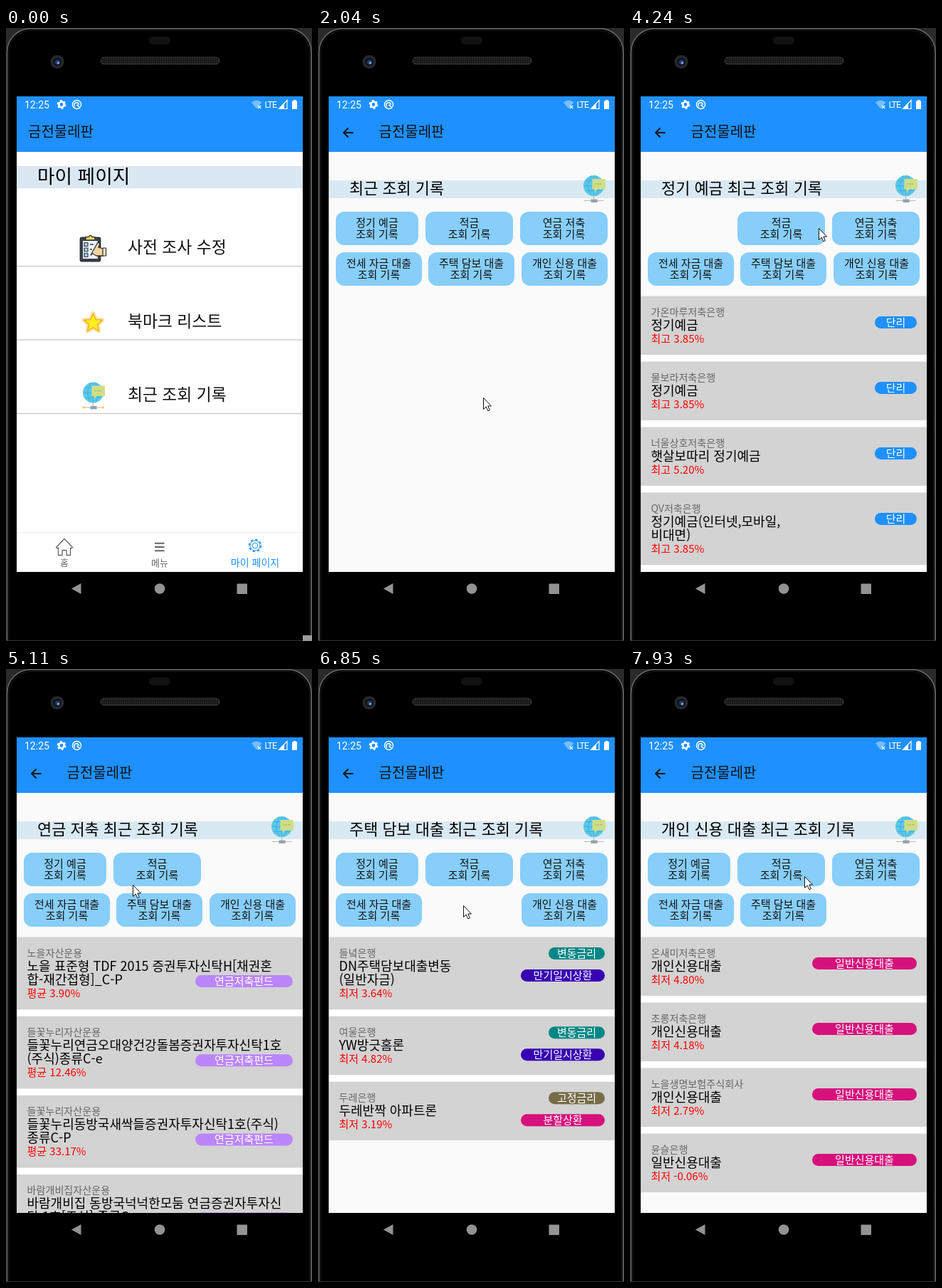
An HTML page that plays this animation: 430x861 px, repeating every 7990 ms.

```html
<!DOCTYPE html>
<html lang="ko">
<head>
<meta charset="utf-8">
<style>
html, body { margin: 0; width: 100%; height: 100%; overflow: hidden; background: #000; }
svg { display: block; width: 430px; height: 861px; }
text { font-family: "Noto Sans CJK KR", "Noto Sans CJK", "Noto Sans", sans-serif; }
.ui { font-family: Roboto, sans-serif; }
</style>
</head>
<body>
<svg id="stage" viewBox="0 0 430 861" xmlns="http://www.w3.org/2000/svg">
  <defs>
    <clipPath id="screenClip"><rect x="15" y="96" width="402" height="668"/></clipPath>
    <pattern id="mesh" width="3" height="3" patternUnits="userSpaceOnUse">
      <rect width="3" height="3" fill="#161616"/><circle cx="1.5" cy="1.5" r=".8" fill="#3c3c3c"/>
    </pattern>
    <g id="globe">
      <circle r="14.5" fill="#5bc8ea"/>
      <path d="M-14 0H14M-12-7H12M-12 7H12M0-14V14M-3-14Q-13 0-3 14M3-14Q13 0 3 14" fill="none" stroke="#3fa9d6" stroke-width=".8"/>
      <path d="M-2-9.500H16.500V5H5L1 9.500V5H-2Z" fill="#d0de88"/>
      <path d="M2-2.500H12" stroke="#aab866" stroke-width="1.500" stroke-dasharray="2 1.200"/>
      <path d="M0 14V19M-14 21H14" stroke="#b9bdb0" stroke-width="1.200"/>
      <rect x="-4" y="19" width="9" height="4.500" fill="#93a3ad"/>
    </g>
  </defs>

  <rect width="430" height="861" fill="#2a2a2b"/>
  <rect x="1.500" y=".8" width="427.500" height="900" rx="33" fill="#000" stroke="#5e6161" stroke-width="1.800"/>
  <rect x="4" y="3.500" width="422.500" height="900" rx="31" fill="#000" stroke="#1c1c1d"/>
  <path d="M0 860.500H430" stroke="#333"/>
  <rect x="201" y="12" width="30" height="11" rx="5.500" fill="#111"/>
  <rect x="133" y="41" width="167" height="10" rx="5" fill="url(#mesh)" stroke="#3a3a3a"/>
  <circle cx="72" cy="47.500" r="9.500" fill="#26282b"/>
  <circle cx="72" cy="47.500" r="6" fill="#101420"/>
  <circle cx="72.500" cy="48" r="3.300" fill="#27406b"/>
  <circle cx="73.500" cy="49" r="1.500" fill="#86b2ef"/>
  <g fill="#939393">
    <path d="M92 787.500L105.500 780V795Z"/><circle cx="216" cy="787.500" r="7.300"/>
    <rect x="324.500" y="780.500" width="14.500" height="14.500" rx="1"/>
  </g>
  <rect id="corner" x="417" y="853" width="13" height="8" fill="#9b9b9b"/>

  <g clip-path="url(#screenClip)">
    <rect id="paper" x="15" y="96" width="402" height="668"/>
    <g id="home">
      <rect x="15" y="194" width="402" height="31" fill="#d9e8f2"/>
      <path d="M15 334.500H417M15 438H417M15 541.500H417" stroke="#cfcfcf" stroke-width="1.400"/>
      <path d="M15 708.500H417" stroke="#ececec"/>
      <!-- clipboard -->
      <g stroke="#30343b" stroke-width="1.800" stroke-linejoin="round">
        <rect x="104.500" y="294.500" width="28" height="33" rx="2" fill="#3c434d"/>
        <rect x="107.500" y="298.500" width="22" height="26" fill="#eef6fb" stroke-width="1"/>
        <path d="M112 298V293.500H116Q118.500 289 121 293.500H125V298Z" fill="#f1d65c" stroke-width="1.300"/>
        <g fill="#9fd5ef" stroke-width="1.200">
          <rect x="110" y="301.500" width="5" height="5"/><rect x="110" y="309" width="5" height="5"/><rect x="110" y="316.500" width="5" height="5"/>
        </g>
        <path d="M118 304H123M118 311H121" stroke-width="1.400"/>
        <path d="M119 319L129 301L132 303L130 308L137 310V320H127L122 317Z" fill="#f4d3a0" stroke-width="1.300"/>
        <rect x="136" y="309" width="4.500" height="11" fill="#f6e7b9" stroke-width="1.200"/>
      </g>
      <path id="halo" fill="#fbe3a0" stroke="#fbe3a0" stroke-width="6" stroke-linejoin="round"/>
      <path id="star" fill="#ffee22" stroke="#f0b429" stroke-width="1.600" stroke-linejoin="round"/>
      <use href="#globe" x="122.500" y="512"/>
      <circle cx="109" cy="533" r="1.800" fill="#f2d24f"/><circle cx="136" cy="533" r="1.800" fill="#f2d24f"/>
      <g fill="none" stroke="#666" stroke-width="1.300" stroke-linejoin="round">
        <path d="M70.500 729.500L82 717.500L93.500 729.500L91.500 731L90.500 730V740.500H85V733.500H79V740.500H73.500V730L72.500 731Z"/>
        <path d="M209 723.700H222.500M209 729H222.500M209 734.300H222.500" stroke-width="1.900"/>
      </g>
      <g fill="none" stroke="#1e90ff">
        <circle cx="350" cy="727" r="7"/><circle cx="350" cy="727" r="3.800"/>
        <circle cx="350" cy="727" r="8.300" stroke-width="1.800" stroke-dasharray="3.260"/>
      </g>
    </g>
    <g id="history">
      <rect x="15" y="214" width="402" height="25" fill="#d9e9f3"/>
      <use href="#globe" x="387.500" y="221.500"/>
    </g>
    <rect x="15" y="96" width="402" height="78" fill="#1e90ff"/>
    <g id="bar">
      <path id="back" d="M49.500 147H36.500M42.500 140.500L36 147L42.500 153.500" fill="none" stroke="#111" stroke-width="1.800"/>
      <g fill="none" stroke="#fff">
        <circle cx="78" cy="107.500" r="3.700" stroke-width="2.600"/>
        <circle cx="78" cy="107.500" r="5.500" stroke-width="1.800" stroke-dasharray="2.880"/>
        <circle cx="99.500" cy="107.500" r="6" stroke-width="1.400"/>
        <path d="M97 110.500A3.300 3.300 0 1 1 102.500 108M99.500 107.500L103 111" stroke-width="1.500"/>
      </g>
      <path d="M345 104.500Q352 98.500 359.500 104.500L352 113.500Z" fill="#fff" opacity=".4"/>
      <path d="M354 109L358 113M358 109L354 113" stroke="#fff" stroke-width="1.300"/>
      <path d="M383.500 113.500H395V101.500Z" fill="none" stroke="#fff" stroke-width="1.200"/>
      <path d="M383.500 113.500H391V105.500Z" fill="#fff"/>
      <path d="M402 102.500H404V101H407.500V102.500H409V114H402Z" fill="#fff"/>
      <text class="ui" x="26" y="112.800" font-size="14" fill="#fff">12:25</text>
      <text class="ui" x="363.500" y="112.200" font-size="12.500" fill="#fff" letter-spacing="-1">LTE</text>
    </g>
    <rect id="scroll" x="413" y="376" width="4" height="103" fill="#000" opacity=".3"/>
  </g>
  <path id="cursor" d="M.5.5V16.500L4.200 13L6.800 18.800L9.300 17.700L6.800 12H11.500Z" fill="#fff" stroke="#111" stroke-width="1"/>
</svg>
<script>
const NS = 'http://www.w3.org/2000/svg';
const $ = id => document.getElementById(id);
const LOOP = 7990;

function add(parent, tag, attrs) {
  const el = document.createElementNS(NS, tag);
  for (const k in attrs) el.setAttribute(k, attrs[k]);
  parent.appendChild(el);
  return el;
}

// text placed by its vertical middle
function label(parent, x, mid, size, str, fill = '#111', anchor = 'start', weight = 500) {
  const el = add(parent, 'text', {
    x, y: mid + size * 0.37, 'font-size': size, fill, 'text-anchor': anchor, 'font-weight': weight
  });
  el.textContent = str;
  return el;
}

const show = (el, on) => el.setAttribute('visibility', on ? 'inherit' : 'hidden');

// home page
const home = $('home');
label(home, 44, 208.5, 26.7, '마이 페이지', '#000');
['사전 조사 수정', '북마크 리스트', '최근 조회 기록'].forEach((s, i) =>
  label(home, 171, 307.5 + i * 103.7, 22.8, s));
label(home, 82, 751, 12.5, '홈', '#666', 'middle', 400);
label(home, 216, 751, 13, '메뉴', '#666', 'middle', 400);
label(home, 350, 750.5, 14, '마이 페이지', '#1e90ff', 'middle');

let star = '';
for (let i = 0; i < 10; i++) {
  const a = -Math.PI / 2 + i * Math.PI / 5, r = i % 2 ? 6.2 : 13.5;
  star += (i ? 'L' : 'M') + (122.5 + r * Math.cos(a)).toFixed(1) + ' ' + (414.5 + r * Math.sin(a)).toFixed(1);
}
for (const id of ['halo', 'star']) $(id).setAttribute('d', star + 'Z');

// history page
const TEAL = '#008080', BLUE = '#1e90ff', PINK = '#d6117b', VIOLET = '#3700b3';
// mid: distance from the card's top to the middle of a lone tag
const tag = (text, w, fill, mid = 37) => ({ text, w, fill, mid });
const simple = tag('단리', 59, BLUE);
const free = tag('자유적립식', 98, '#0000cd');
const fixed = tag('정액적립식', 98, TEAL);
const fund = tag('연금저축펀드', 137, '#bb86fc', 62);
const floating = tag('변동금리', 79, '#018786');
const steady = tag('고정금리', 79, '#776c49');
const bullet = tag('만기일시상환', 118, VIOLET);
const split = tag('분할상환', 118, PINK);
const credit = tag('일반신용대출', 147, PINK);

// card: bank, product lines joined by "|", rate, tags
const tabs = [
  { name: '정기 예금', x: 25, w: 116, row: 0, cards: [
    ['가온마루저축은행', '정기예금', '최고 3.85%', simple],
    ['물보라저축은행', '정기예금', '최고 3.85%', simple],
    ['너울상호저축은행', '햇살보따리 정기예금', '최고 5.20%', simple],
    ['QV저축은행', '정기예금(인터넷,모바일,|비대면)', '최고 3.85%', simple]] },
  { name: '적금', x: 151, w: 123, row: 0, cards: [
    ['도담은행', '콩알가득적금', '최고 5.20%', simple, free],
    ['해담저축은행', '해담 걸음 적금', '최고 10.00%', simple, fixed],
    ['다온누리저축은행', '달마다모음적금', '최고 4.30%', simple, fixed],
    ['보늬저축은행', '보늬네 냥적금 with 몽냥', '최고 5.00%', simple, fixed],
    ['도담은행', '콩알가득적금', '최고 5.20%', simple, free]] },
  { name: '연금 저축', x: 284, w: 123, row: 0, cards: [
    ['노을자산운용', '노을 표준형 TDF 2015 증권투자신탁H[채권혼|합-재간접형]_C-P', '평균 3.90%', fund],
    ['들꽃누리자산운용', '들꽃누리연금오대양건강돌봄증권자투자신탁1호|(주식)종류C-e', '평균 12.46%', fund],
    ['들꽃누리자산운용', '들꽃누리동방국새싹들증권자투자신탁1호(주식)|종류C-P', '평균 33.17%', fund],
    ['바람개비집자산운용', '바람개비집 동방국넉넉한모둠 연금증권자투자신|탁 1호[주식] 종류C', '평균 8.20%', fund]] },
  { name: '전세 자금 대출', x: 25, w: 121, row: 1, cards: [
    ['들녘은행', '전세자금대출', '최저 3.42%', floating, bullet],
    ['여울은행', '전세자금대출', '최저 3.75%', floating, bullet],
    ['두레은행', '전월세보증금대출', '최저 3.58%', steady, bullet],
    ['윤슬은행', '전세자금대출', '최저 4.05%', floating, bullet],
    ['도담은행', '전세자금대출', '최저 4.11%', floating, bullet]] },
  { name: '주택 담보 대출', x: 155, w: 121, row: 1, cards: [
    ['들녘은행', 'DN주택담보대출변동|(일반자금)', '최저 3.64%', floating, bullet],
    ['여울은행', 'YW방긋홈론', '최저 4.82%', floating, bullet],
    ['두레은행', '두레반짝 아파트론', '최저 3.19%', steady, split]] },
  { name: '개인 신용 대출', x: 286, w: 121, row: 1, cards: [
    ['온새미저축은행', '개인신용대출', '최저 4.80%', credit],
    ['초롱저축은행', '개인신용대출', '최저 4.18%', credit],
    ['노을생명보험주식회사', '개인신용대출', '최저 2.79%', credit],
    ['윤슬은행', '일반신용대출', '최저 -0.06%', credit]] }
];

function drawTag(g, t, mid) {
  add(g, 'rect', { x: 403 - t.w, y: mid - 8.5, width: t.w, height: 17, rx: 8.5, fill: t.fill });
  label(g, 403 - t.w / 2, mid, 15, t.text, '#fff', 'middle');
}

function drawCards(g, cards) {
  let y = 376.5;
  for (const [bank, product, rate, ...tags] of cards) {
    const lines = product.split('|'), extra = (lines.length - 1) * 19.2;
    add(g, 'rect', { x: 15, y, width: 402, height: 92 + extra, fill: '#fff' });
    add(g, 'rect', { x: 15, y, width: 402, height: 82.5 + extra, fill: '#d3d3d3' });
    label(g, 29.5, y + 22, 14.1, bank, '#666', 'start', 400);
    lines.forEach((s, i) => label(g, 29.5, y + 40.5 + i * 19.2, 18, s, '#000'));
    label(g, 29.5, y + 59.5 + extra, 15, rate, '#f00');
    if (tags.length > 1) tags.forEach((t, i) => drawTag(g, t, y + 23 + i * 31));
    else drawTag(g, tags[0], y + tags[0].mid);
    y += 92 + extra;
  }
  // no gap strip below the last card when the list ends on screen
  if (y < 760) add(g, 'rect', { x: 15, y: y - 9.5, width: 402, height: 10, fill: '#fafafa' });
}

const history = $('history');
const heading = label(history, 44, 225, 21.9, '', '#000');
for (const tab of tabs) {
  const y = 258 + tab.row * 57, cx = tab.x + tab.w / 2;
  tab.button = add(history, 'g', {});
  add(tab.button, 'rect', { x: tab.x, y, width: tab.w, height: 47, rx: 12, fill: '#87cefa' });
  label(tab.button, cx, y + 15.3, 15, tab.name, '#111', 'middle');
  label(tab.button, cx, y + 31.3, 15, '조회 기록', '#111', 'middle');
  tab.list = add(history, 'g', {});
  drawCards(tab.list, tab.cards);
}

const appName = label($('bar'), 31, 146, 20, '금전물레판', '#111');

// [time, tab]: -2 home page, -1 history page without a list
const pages = [[0, -2], [2040, -1], [2110, 1], [3630, 0], [4840, 2], [5710, 3], [6650, 4], [7530, 5]];

// [time, x, y] of the pointer tip
const path = [
  [70, 424, 850], [820, 239, 527], [890, 239, 527], [1060, 217, 504], [1230, 232, 519],
  [2600, 232, 519], [3060, 102, 283], [3970, 102, 283], [4240, 265, 281], [4500, 336, 292],
  [4770, 330, 284], [4840, 330, 284], [5110, 178, 303], [5580, 92, 335],
  [5680, 92, 335], [6050, 204, 332], [6850, 204, 332], [7400, 338, 334],
  [7500, 338, 334], [7930, 245, 291]
];

function pointer(t) {
  let i = 0;
  while (i < path.length - 1 && path[i + 1][0] <= t) i++;
  const [t0, x0, y0] = path[i], [t1, x1, y1] = path[i + 1] || [LOOP, x0, y0];
  const u = Math.min(1, Math.max(0, (t - t0) / (t1 - t0))), e = u * u * (3 - 2 * u);
  return [x0 + (x1 - x0) * e, y0 + (y1 - y0) * e];
}

function update(t) {
  const page = pages.filter(p => p[0] <= t).pop()[1];
  const atHome = page === -2;
  show(home, atHome);
  show(history, !atHome);
  show($('back'), !atHome);
  appName.setAttribute('x', atHome ? 31 : 85.5);
  $('paper').setAttribute('fill', atHome ? '#fff' : '#fafafa');
  heading.textContent = (page >= 0 ? tabs[page].name + ' ' : '') + '최근 조회 기록';
  tabs.forEach((tab, i) => {
    show(tab.button, i !== page);
    show(tab.list, i === page);
  });
  const fade = t < 3200 ? 0.3 : t < 3270 ? 0.15 : t < 3410 ? 0.02 : 0;
  $('scroll').setAttribute('opacity', page === 1 ? fade : 0);
  show($('corner'), t < 70);
  show($('cursor'), t >= 70);
  const [x, y] = pointer(t);
  $('cursor').setAttribute('transform', `translate(${x.toFixed(1)} ${y.toFixed(1)})`);
}

let start;
function tick(now) {
  if (start === undefined) start = now;
  update((now - start) % LOOP);
  requestAnimationFrame(tick);
}
update(0);
requestAnimationFrame(tick);
</script>
</body>
</html>
```
